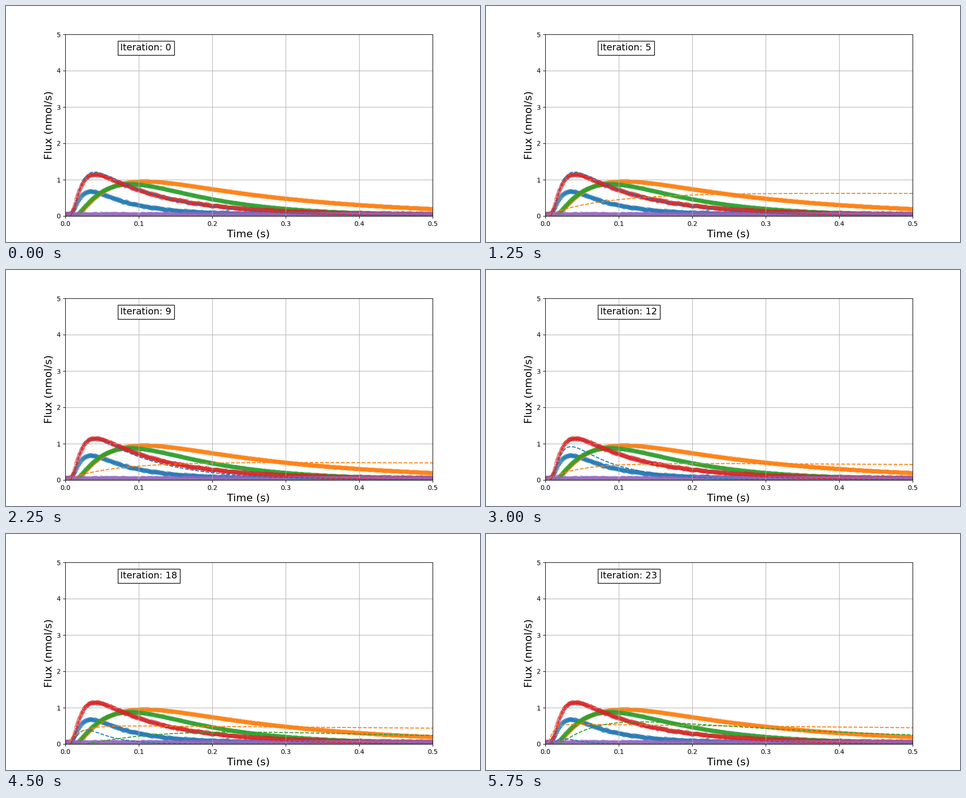
A matplotlib script for the animation above (8500 ms loop, 1000 px wide and 500 px high).

```python
import numpy as np
import matplotlib.pyplot as plt
from matplotlib.animation import FuncAnimation

plt.rcParams["font.family"] = "DejaVu Sans"

INTERVAL = 250
FRAMES = 34
LAST_ITERATION = 23
TAU = 0.24      # diffusion time of the pulse, s
BASELINE = 0.05
rng = np.random.default_rng(4)


def diffusion(t, peak):
    """Exit flux of an inert pulse, scaled to the given peak."""
    x = np.maximum(t, 1e-5) / TAU
    total = sum((-1) ** n * (2 * n + 1) * np.exp(-((n + 0.5) * np.pi) ** 2 * x)
                for n in range(60))
    flux = np.pi * total / 1.85 * peak
    return np.where(x < 0.012, 0, np.maximum(flux, 0))


def release(t, size, rise, power, delay, decay):
    """Delayed rise followed by an exponential decay."""
    grown = 1 - np.exp(-(np.maximum(t - delay, 0) / rise) ** power)
    return size * grown * np.exp(-decay * t)


def progress(k, start):
    return np.clip((k - start) / (LAST_ITERATION - start), 0, 1)


def blue_model(k, t):
    loss = 36 * progress(k, 7) ** 1.6
    scale = 1 / (1 + (loss / 26) ** 1.75)
    return scale * diffusion(t, 1.21) * np.exp(-loss * t)


def orange_model(k, t):
    u = progress(k, 7)
    size = 0.435 + 0.118 * u + 0.24 * np.exp(-10 * u)
    rise = 0.085 * np.exp(-2.5 * u ** 1.15)
    return release(t, size, rise, 0.9 + 0.1 * u, 0.002 + 0.002 * u, 0.15 + 0.27 * u)


def green_model(k, t):
    v = progress(k, 15)
    return release(t, 0.967 * v ** 0.42, 0.175 - 0.12 * v, 1.15,
                   0.029 - 0.011 * v, 1.6 + 1.1 * v)


def model(k, t):
    """Blue, orange, green, red and purple model curves at iteration k."""
    zero = np.zeros_like(t)
    red = diffusion(t, 1.14)
    if k == 0:
        return blue_model(k, t), zero, zero, red, zero
    if k <= 4:  # the first steps overshoot
        return zero, release(t, 52.4, 0.023, 1, 0.001, 9.4), zero, red, zero
    return blue_model(k, t), orange_model(k, t), green_model(k, t), red, zero


fig, ax = plt.subplots(figsize=(10, 5), dpi=100)
ax.set_xlim(0, 0.5)
ax.set_ylim(0, 5)
ax.set_xlabel("Time (s)", fontsize=16, x=0.4987)
ax.set_ylabel("Flux (nmol/s)", fontsize=16)
ax.grid(True)

time = np.linspace(0, 0.5, 501)
inert = diffusion(time, 1.10)
noise = rng.normal(0, 0.01, (3, time.size))
measured = [
    0.74 * inert * np.exp(-7 * time) + BASELINE + noise[0],
    release(time, 1.86, 0.055, 1.15, 0.016, 4.5),
    release(time, 2.72, 0.0645, 1.25, 0.014, 8.7),
    inert + BASELINE + noise[1],
    BASELINE + noise[2],
]
for i, flux in enumerate(measured):
    ax.scatter(time, flux, color=f"C{i}", alpha=0.35)

curves = [ax.plot([], [], "--", color=f"C{i}", lw=1.5)[0] for i in range(5)]
label = ax.text(0.15, 0.95, "", transform=ax.transAxes, fontsize=14,
                va="top", bbox=dict(facecolor="white"))


def update(frame):
    k = min(frame, LAST_ITERATION)
    for curve, flux in zip(curves, model(k, time)):
        curve.set_data(time, flux)
    label.set_text(f"Iteration: {k}")
    return [*curves, label]


anim = FuncAnimation(fig, update, frames=FRAMES, interval=INTERVAL,
                     repeat=True, repeat_delay=0, blit=False)
plt.show()
```
